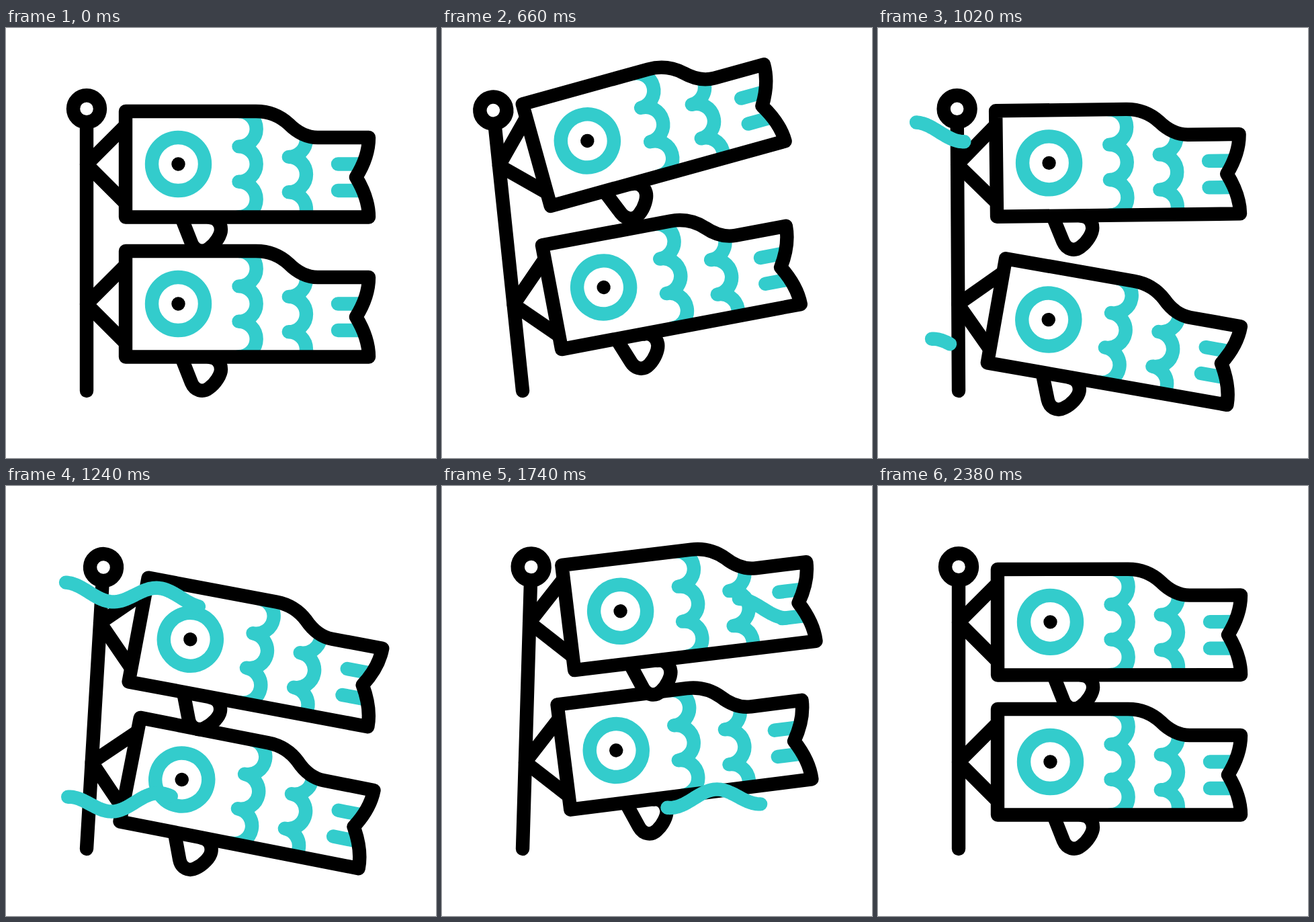
Recreate the animation shown at these times as an HTML page. Size 640 by 640 pixels, loop 2.4 s.

```html
<!DOCTYPE html>
<html lang="en">
<head>
<meta charset="utf-8">
<title>Koinobori in the wind</title>
<style>
html, body { margin: 0; width: 100%; height: 100%; overflow: hidden; background: #fff; }
svg { display: block; width: 100vw; height: 100vh; }
</style>
</head>
<body>
<svg viewBox="0 0 640 640" fill="none" stroke-width="20.4" stroke-linecap="round" stroke-linejoin="round">
  <defs>
    <path id="body" d="M178 124H372C391 124 408 131 421 143C434 156 448 163 464 163H540C540 184 531 206 521 222C533 242 540 262 540 281.500H178Z"/>
    <clipPath id="inside"><use href="#body"/></clipPath>
    <g id="fish">
      <path d="M178 145L120 203L178 261" stroke="#000"/>
      <path d="M261 282L276 320C281 332 293 335 302 328C312 321 320 308 320 300C320 290 313 282 303 282" fill="#fff" stroke="#000"/>
      <use href="#body" fill="#fff"/>
      <g clip-path="url(#inside)" stroke="#33cccc">
        <path d="M346.500 124a26.200 26.200 0 0 1 0 52.400a26.200 26.200 0 0 1 0 52.400a26.200 26.200 0 0 1 0 52.400"/>
        <path d="M420.800 139.500a26.200 26.200 0 0 1 0 52.400a26.200 26.200 0 0 1 0 52.400a26.200 26.200 0 0 1 0 52.400"/>
        <path d="M494 202.500H545M494 242H545"/>
      </g>
      <circle cx="256.500" cy="202.500" r="39.500" stroke="#33cccc"/>
      <circle cx="256.500" cy="202.500" r="10.200" fill="#000"/>
      <use href="#body" stroke="#000"/>
    </g>
  </defs>
  <g id="pole">
    <path d="M120 142V540" stroke="#000"/>
    <circle cx="120" cy="120.300" r="20" stroke="#000"/>
    <g transform="translate(0 208)"><use id="low" href="#fish"/></g>
    <use id="high" href="#fish"/>
  </g>
  <path id="gust1" stroke="#33cccc"/>
  <path id="gust2" stroke="#33cccc"/>
</svg>
<script>
const LOOP = 2400;
const el = id => document.getElementById(id);
const clamp = x => Math.min(1, Math.max(0, x));
const ease = x => x * x * (3 - 2 * x);

// [time, angle] keys, eased between neighbours
const poleKeys = [[0, 0], [575, -6.03], [630, -6.03], [1346, 4], [2070, 0], [LOOP, 0]];
const highKeys = [[0, 0], [245, 0], [700, -9.7], [1320, 8], [1917, -13], [LOOP, 0]];
const lowKeys = [[0, 0], [500, -8.2], [1090, 11], [1680, -9.3], [2180, 0], [LOOP, 0]];

// x, y: where the stroke begins; drift, rise: how far it is carried between from and to
const gusts = [
  { id: 'gust1', x: 38.8, y: 151, drift: 148, rise: 14.5, from: 740, to: 2020,
    slope: 0.06, period: 137, head: 897, tail: 1266 },
  { id: 'gust2', x: 79.5, y: 475, drift: 73, rise: 0, from: 971, to: 1988,
    slope: -0.042, period: 133, head: 974, tail: 1404 }
];
const SPEED = 0.575, HEIGHT = 12.3;

function angleAt(keys, t) {
  let i = 1;
  while (i < keys.length - 1 && t > keys[i][0]) i++;
  const [t0, a0] = keys[i - 1], [t1, a1] = keys[i];
  return a0 + (a1 - a0) * ease(clamp((t - t0) / (t1 - t0)));
}

function turn(id, angle, x, y) {
  el(id).setAttribute('transform', `rotate(${angle.toFixed(3)} ${x} ${y})`);
}

// A drifting cosine stroke, revealed by its head and erased by its tail
function gustPath(g, t) {
  const len = g.period * 2.5;
  const reach = start => Math.min(len, Math.max(0, (t - start) * SPEED));
  const a = reach(g.tail), b = reach(g.head);
  if (b - a < 0.5) return '';
  const moved = ease(clamp((t - g.from) / (g.to - g.from)));
  const x0 = g.x + g.drift * moved, y0 = g.y + g.rise * moved;
  const steps = Math.max(2, Math.ceil((b - a) / 3));
  const pts = [];
  for (let i = 0; i <= steps; i++) {
    const s = a + (b - a) * i / steps;
    const y = y0 + g.slope * s - HEIGHT * Math.cos(2 * Math.PI * s / g.period);
    pts.push((x0 + s).toFixed(2) + ' ' + y.toFixed(2));
  }
  return 'M' + pts.join('L');
}

function draw(t) {
  turn('pole', angleAt(poleKeys, t), 120, 540);
  turn('high', angleAt(highKeys, t), 120, 203);
  turn('low', angleAt(lowKeys, t), 120, 203);
  for (const g of gusts) el(g.id).setAttribute('d', gustPath(g, t));
}

const begin = performance.now();
function tick() {
  draw((performance.now() - begin) % LOOP);
  requestAnimationFrame(tick);
}
draw(0);
requestAnimationFrame(tick);
</script>
</body>
</html>
```
